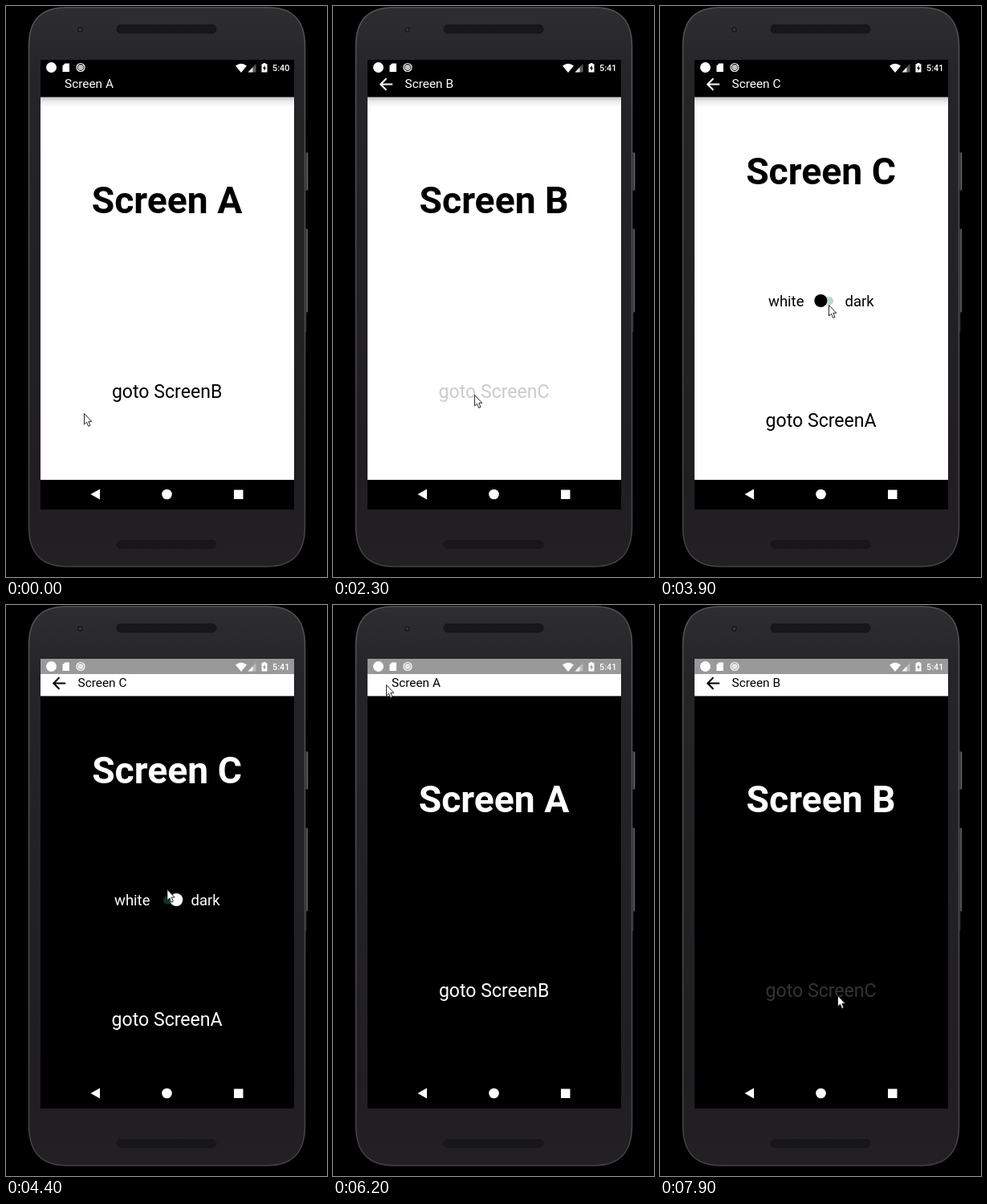
Recreate the animation shown at these times as an HTML page. Size 400 by 711 pixels, loop 8000 ms.

```html
<!DOCTYPE html>
<html lang="en">
<head>
<meta charset="utf-8">
<title>Screen navigation</title>
<style>
html, body { margin: 0; width: 100%; height: 100%; overflow: hidden; background: #000; }
svg { display: block; width: 100%; height: 100%; font-family: Roboto, "Open Sans", sans-serif; }
#screen { --page: #fff; --ink: #000; --bar: #000; --barInk: #fff; --track: #b3b3b3; }
#screen.on { --track: #b8d9d3; }
#screen.dark { --page: #000; --ink: #fff; --bar: #fff; --barInk: #000; --track: #08352c; }
.page { fill: var(--page); }
.bar { fill: var(--bar); }
.title { fill: var(--ink); font-size: 46.3px; font-weight: 700; text-anchor: middle; }
.link { fill: var(--ink); font-size: 23.1px; text-anchor: middle; }
.label { fill: var(--ink); font-size: 18.5px; }
.head { fill: var(--barInk); font-size: 15.4px; }
.back { fill: none; stroke: var(--barInk); stroke-width: 2.1; }
.track { fill: var(--track); }
.thumb { fill: var(--ink); }
.clock { font-size: 10.8px; font-weight: 500; }
</style>
</head>
<body>
<svg viewBox="0 0 400 711" xmlns="http://www.w3.org/2000/svg">
  <defs>
    <linearGradient id="shell" x1="0" y1="0" x2="0" y2="1">
      <stop offset="0" stop-color="#2e2d30"/>
      <stop offset=".12" stop-color="#252427"/>
      <stop offset=".85" stop-color="#201e21"/>
      <stop offset="1" stop-color="#222023"/>
    </linearGradient>
    <linearGradient id="rim" x1="0" y1="0" x2="0" y2="1">
      <stop offset="0" stop-color="#515154"/>
      <stop offset="1" stop-color="#424245"/>
    </linearGradient>
    <linearGradient id="shade" x1="0" y1="0" x2="0" y2="1">
      <stop offset="0" stop-color="#000" stop-opacity=".24"/>
      <stop offset=".45" stop-color="#000" stop-opacity=".08"/>
      <stop offset="1" stop-color="#000" stop-opacity="0"/>
    </linearGradient>
    <pattern id="mesh" width="4" height="4" patternUnits="userSpaceOnUse">
      <rect width="4" height="4" fill="#19181a"/>
      <circle cx="1" cy="1" r=".8" fill="#0e0e10"/>
      <circle cx="3" cy="3" r=".8" fill="#0e0e10"/>
    </pattern>
    <clipPath id="glass"><rect x="43" y="67" width="316" height="560"/></clipPath>
  </defs>

  <rect width="400" height="711" fill="#000"/>
  <g id="phone">
    <g id="buttons" fill="#2a292c">
      <rect x="371" y="182" width="5.5" height="48" rx="1.5"/>
      <rect x="371" y="277" width="5" height="105" rx="1.5"/>
      <rect x="371" y="382" width="3.5" height="24"/>
      <path d="M375.4 183V229M375.2 278V381" stroke="#6c6c6f" stroke-width="1.3"/>
    </g>
    <path d="M28.5 50C28.5 18 43 1.7 76 1.7H326C358 1.7 372.5 18 372.5 50V648C372.5 681 358 698 325 698H76C43 698 28.5 681 28.5 648Z"
      fill="url(#shell)" stroke="url(#rim)" stroke-width="1.6"/>
    <circle cx="92.5" cy="29.5" r="4.5" fill="#1c1b1e" stroke="#343437"/>
    <circle cx="92.5" cy="29.5" r="1.8" fill="#353a42"/>
    <rect x="138" y="23.5" width="124" height="10.5" rx="5" fill="url(#mesh)" stroke="#151416"/>
    <rect x="138" y="665.5" width="124" height="10" rx="5" fill="url(#mesh)" stroke="#151416"/>
  </g>

  <g id="screen" clip-path="url(#glass)">
    <rect x="42" y="67" width="318" height="560" fill="#e9e9ef"/>
    <g id="cards"></g>
    <rect x="42" y="67" width="318" height="19" fill="#000" fill-opacity=".4"/>
    <rect x="42" y="590" width="318" height="38" fill="#000"/>
    <g id="status" fill="#fff">
      <circle cx="56.5" cy="76.5" r="6.5"/>
      <path d="M73.5 71.5H79V82H70.5V74.5Z"/>
      <circle cx="93" cy="76.5" r="5" fill="none" stroke="#fff" stroke-width="1.2"/>
      <circle cx="93" cy="76.5" r="3.6" fill-opacity=".75"/>
      <path d="M286 74.5Q293 68.8 300 74.5L293 83Z"/>
      <path d="M301.5 82.5L311.5 72V82.5Z" fill-opacity=".35"/>
      <path d="M301.5 82.5L307.5 76.2V82.5Z" fill-opacity=".85"/>
      <path fill-rule="evenodd" d="M320.5 72.2V71H323.5V72.2H325.5V82.5H318.5V72.2ZM322.6 73.8L320 78H321.6V81L324.2 76.7H322.6Z"/>
      <text id="clock" class="clock" x="332" y="80.8"></text>
    </g>
    <g id="nav" fill="#fff">
      <path d="M105.5 608L117 601.5V614.5Z"/>
      <circle cx="200.5" cy="608" r="6.3"/>
      <rect x="284" y="602.5" width="11.5" height="11.5"/>
    </g>
  </g>
  <path id="cursor" d="M.5 .5V14L3.5 11.2L5.7 16.4L8 15.4L5.8 10.3H9.8Z"
    fill="#fff" stroke="#111" stroke-width=".9" stroke-linejoin="round"/>
</svg>
<script>
const LOOP = 8000, TICK = 100, WIDTH = 317, MID = 200.6;
const $ = id => document.getElementById(id);

// Pushes ease out, pops are short and linear.
const easeOut = x => 1 - (1 - x) ** 4.5;
const linear = x => x;
const moves = [
  { at: 1310, to: 1, ms: 450, ease: easeOut },
  { at: 2440, to: 2, ms: 450, ease: easeOut },
  { at: 5282, to: 1, ms: 100, ease: linear },
  { at: 6089, to: 0, ms: 100, ease: linear },
  { at: 7310, to: 1, ms: 450, ease: easeOut }
];

// Pointer stops: time, x, y
const stops = [
  [0, 97, 507], [200, 110, 511], [500, 176, 484],
  [2750, 176, 484], [3300, 204, 372], [3500, 210, 372],
  [4250, 210, 372], [5200, 66, 99],
  [6400, 66, 99], [6800, 198, 512], [7000, 221, 486], [LOOP, 221, 486]
];

// Touch periods per card
const linkPress = [[[1300, 1500], [7300, 7500]], [[2300, 2600], [7900, 8000]], []];
const backPress = [[], [[5900, 6200]], [[5200, 5400]]];

const clamp = x => Math.min(1, Math.max(0, x));
const within = (t, spans) => spans.some(([a, b]) => t >= a && t < b);

function cardMarkup(name, next, i) {
  const last = i === 2;
  const arrow = i ? '<path class="back" d="M74.2 97.5H59.5M66.5 90.3L59.3 97.5L66.5 104.7"/>' : '';
  const toggle = last ? `
    <text class="label" x="135" y="373.7">white</text>
    <text class="label" x="230.5" y="373.7">dark</text>
    <rect class="track" x="196" y="362" width="20" height="10.5" rx="5.2"/>
    <circle class="thumb" cy="367" r="8"/>` : '';
  return `<g>
    <rect class="page" x="42" y="67" width="318" height="524"/>
    <rect x="42" y="113" width="318" height="13" fill="url(#shade)"/>
    <rect class="bar" x="42" y="67" width="318" height="46.4"/>
    ${arrow}
    <text class="head" x="${i ? 89.5 : 73}" y="102.2">Screen ${name}</text>
    <text class="title" x="${MID}" y="${last ? 222 : 258.4}">Screen ${name}</text>
    ${toggle}
    <text class="link" x="${MID}" y="${last ? 523.7 : 487.6}">goto Screen${next}</text>
  </g>`;
}

$('cards').innerHTML = ['AB', 'BC', 'CA'].map(([name, next], i) => cardMarkup(name, next, i)).join('');
const cards = [...$('cards').children];
const thumb = document.querySelector('.thumb');

function depthAt(t) {
  return moves.reduce((d, m) => d + (m.to - d) * m.ease(clamp((t - m.at) / m.ms)), 0);
}

function pointerAt(t) {
  const i = Math.max(1, stops.findIndex(s => s[0] >= t));
  const [t0, x0, y0] = stops[i - 1], [t1, x1, y1] = stops[i];
  const k = (t - t0) / (t1 - t0), e = k * k * (3 - 2 * k);
  return [x0 + (x1 - x0) * e, y0 + (y1 - y0) * e];
}

function draw(t) {
  const depth = depthAt(t);
  cards.forEach((card, i) => {
    const gap = i - depth;
    const x = gap > 0 ? WIDTH * gap : 0.3 * WIDTH * gap;
    card.setAttribute('transform', `translate(${x.toFixed(2)} 0)`);
    card.setAttribute('opacity', 1 - 0.15 * clamp(-gap));
    card.style.display = Math.abs(gap) < 1 ? '' : 'none';
    card.querySelector('.link').setAttribute('opacity', within(t, linkPress[i]) ? 0.2 : 1);
    const back = card.querySelector('.back');
    if (back) back.setAttribute('opacity', within(t, backPress[i]) ? 0.75 : 1);
  });
  $('screen').classList.toggle('on', t >= 3800);
  $('screen').classList.toggle('dark', t >= 4000);
  thumb.setAttribute('cx', 200.3 + 12 * clamp((t - 3900) / 250));
  $('clock').textContent = t < 900 ? '5:40' : '5:41';
  $('cursor').setAttribute('transform', `translate(${pointerAt(t).map(v => v.toFixed(1)).join(' ')})`);
}

let start;
function frame(now) {
  start ??= now;
  draw(Math.floor((now - start) % LOOP / TICK) * TICK);
  requestAnimationFrame(frame);
}
draw(0);
requestAnimationFrame(frame);
</script>
</body>
</html>
```
